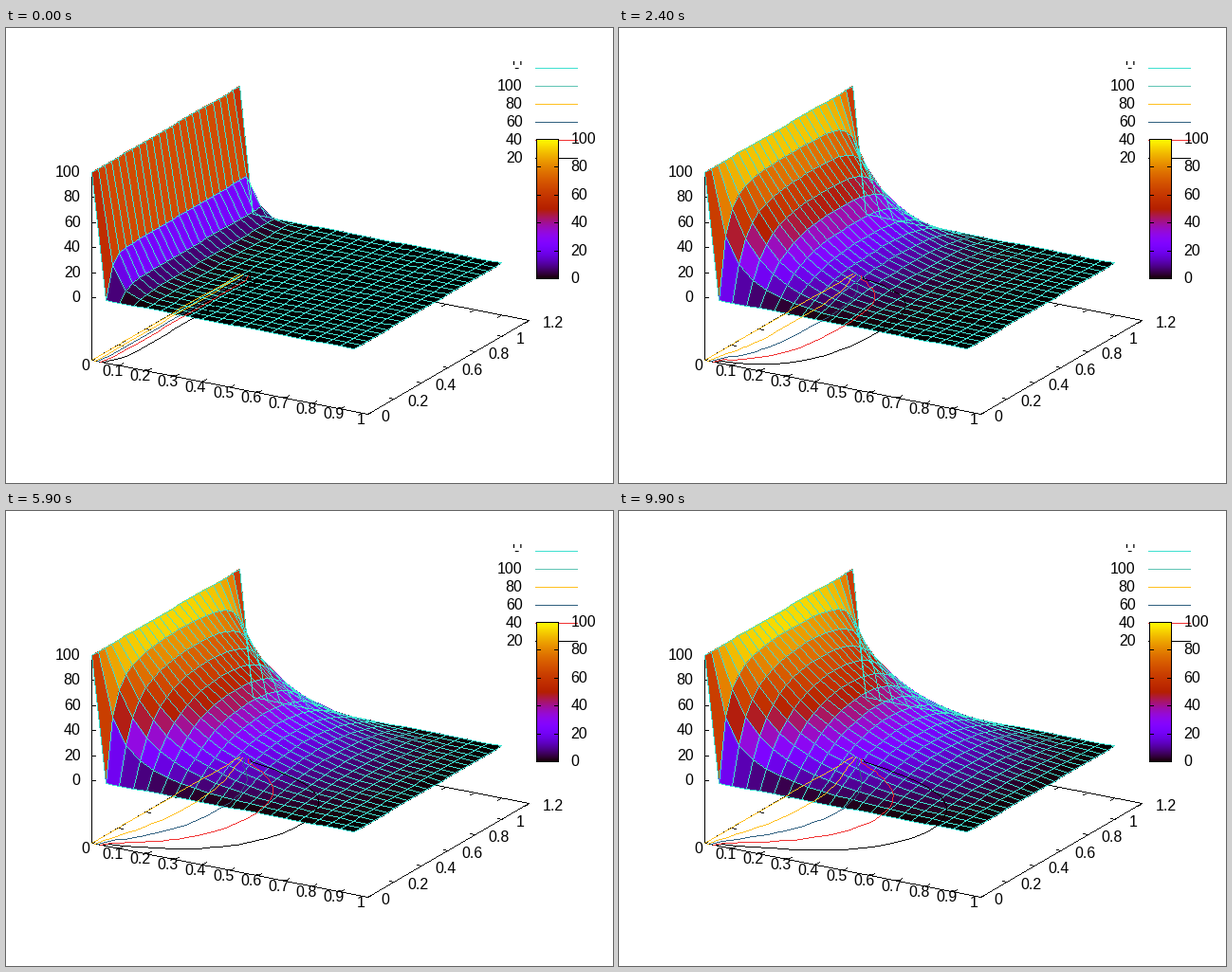
Recreate the animation shown at these times as a matplotlib script. Size 640 by 480 pixels, loop 10 s.

```python
import numpy as np
import matplotlib.pyplot as plt
from matplotlib.animation import FuncAnimation
from matplotlib.collections import PolyCollection
from matplotlib.patches import PathPatch
from matplotlib.path import Path

W, H, DPI = 640, 480, 100
FRAMES, INTERVAL = 100, 100
STEP, NX, NY = 0.05, 20, 23
TEAL, GOLD, BLUE, RED = "#40e0d0", "#ffc020", "#306080", "#f03232"
LEVELS = {20: "black", 40: RED, 60: BLUE, 80: GOLD}
BASE = -50

plt.rcParams["font.family"] = "Liberation Sans"
plt.rcParams["font.size"] = 16 * 72 / DPI


def project(x, y, z=BASE):
    """Data coordinates to stage pixels."""
    return 90 + 291 * x + 170 / 1.2 * y, 284 + 57 * x - 99 / 1.2 * y - 1.32 * z


def snap(p):
    return np.floor(np.asarray(p, float) + 0.5)


def palette(v):
    v = np.clip(v, 0, 1)
    blue = np.clip(np.sin(2 * np.pi * v), 0, 1)
    return np.stack([np.sqrt(v), v ** 3, blue], axis=-1)


def relax(u):
    """One Gauss-Seidel sweep of the Laplace equation."""
    u = u.copy()
    for i in range(1, NX - 1):
        for j in range(1, NY - 1):
            u[i, j] = (u[i - 1, j] + u[i + 1, j] + u[i, j - 1] + u[i, j + 1]) / 4
    return u


u = np.zeros((NX, NY))
u[0] = 100
states = []
for _ in range(FRAMES):
    u = relax(u)
    states.append(u)

gx, gy = np.meshgrid(np.arange(NX) * STEP, np.arange(NY) * STEP, indexing="ij")
floor_x, floor_y = project(gx, gy)

fig = plt.figure(figsize=(W / DPI, H / DPI), dpi=DPI, facecolor="white")
ax = fig.add_axes([0, 0, 1, 1])
ax.axis("off")
# Whole numbers are pixel centres.
ax.set_xlim(-0.5, W - 0.5)
ax.set_ylim(H - 0.5, -0.5)

SQUARE = np.array([[-0.5, -0.5], [0.5, -0.5], [0.5, 0.5], [-0.5, 0.5], [-0.5, -0.5]])
SQUARE_CODES = [Path.MOVETO, Path.LINETO, Path.LINETO, Path.LINETO, Path.CLOSEPOLY]


def pixel_path(polylines):
    """Hard-edged lines, one pixel wide, as a path of unit squares."""
    runs = [np.empty((0, 2))]
    for pts in polylines:
        pts = snap(pts)
        for p, d in zip(pts, np.diff(pts, axis=0)):
            n = max(int(np.abs(d).max()), 1)
            runs.append(p + snap(np.arange(n + 1)[:, None] / n * d))
    dots = np.concatenate(runs)
    verts = (dots[:, None] + SQUARE).reshape(-1, 2)
    return Path(verts, np.tile(SQUARE_CODES, len(dots)).astype(Path.code_type))


def pen(color, z, polylines=()):
    patch = PathPatch(pixel_path(polylines), facecolor=color, edgecolor="none",
                      linewidth=0, antialiased=False, zorder=z)
    return ax.add_artist(patch)


def tick(p, dx, dy, z=1):
    pen("black", z, [[p, (p[0] + dx, p[1] + dy)]])


def label(x, y, text, ha):
    x, y = snap((x, y))
    ax.text(x - 1, y + 4.5, text, ha=ha, va="baseline", zorder=9)


def draw_axes():
    corners = [project(*c) for c in ((0, 0), (1, 0), (1, 1.2), (0, 1.2), (0, 0))]
    pen("black", 1, [corners, [project(0, 0), project(0, 0, 100)]])
    for k in range(11):
        x = k / 10
        p = project(x, 0)
        tick(p, 4.3, -2.5)
        tick(project(x, 1.2), -4.3, 2.5)
        label(p[0] - 6, p[1] + 6, f"{x:g}", "center")
    for k in range(7):
        y = k / 5
        p = project(1, y)
        tick(p, -5, -1)
        tick(project(0, y), 5, 1)
        label(p[0] + 15, p[1] + 3, f"{y:g}", "left")
    for z in range(0, 101, 20):
        p = project(0, 0, z)
        tick(p, 4, 0)
        label(79, p[1], str(z), "right")


def draw_legend():
    rows = [("'-'", TEAL), ("100", "#60c4b4"), ("80", GOLD),
            ("60", BLUE), ("40", RED), ("20", "black")]
    for k, (text, color) in enumerate(rows):
        y = 42 + 19 * k
        pen(color, 1, [[(558, y), (602, y)]])
        label(545, y, text, "right")


def draw_colorbox():
    left, right, top, bottom = 559, 582, 117, 264
    ramp = palette(np.linspace(1, 0, bottom - top + 1))[:, None, :]
    ax.imshow(ramp, extent=(left - 0.5, right + 0.5, bottom + 0.5, top - 0.5),
              aspect="auto", interpolation="nearest", zorder=7)
    pen("black", 8, [[(left, top), (right, top), (right, bottom),
                      (left, bottom), (left, top)]])
    for v in range(0, 101, 20):
        y = bottom - (bottom - top) * v / 100
        tick((left, y), 4, 0, z=8)
        tick((right, y), -4, 0, z=8)
        label(596, y, str(v), "left")


draw_axes()
draw_legend()
draw_colorbox()

# The 100 level runs along the foot of the hot wall.
pen(GOLD, 5, [np.column_stack([floor_x[0], floor_y[0]])])

cells = PolyCollection([], edgecolors="none", linewidths=0, antialiased=False, zorder=3)
ax.add_collection(cells, autolim=False)
wires = pen(TEAL, 4)
contours = [pen(color, 5) for color in LEVELS.values()]


def update(n):
    u = states[n]
    pts = snap(np.stack(project(gx, gy, u), axis=-1))

    # Far rows first, so nearer cells cover them.
    quads = np.stack([pts[:-1, :-1], pts[1:, :-1], pts[1:, 1:], pts[:-1, 1:]], axis=2)
    mean = (u[:-1, :-1] + u[1:, :-1] + u[1:, 1:] + u[:-1, 1:]) / 400
    cells.set_verts(quads[:, ::-1].transpose(1, 0, 2, 3).reshape(-1, 4, 2))
    cells.set_facecolor(palette(mean[:, ::-1].T.ravel()))
    wires.set_path(pixel_path([*pts, *pts.transpose(1, 0, 2)]))

    found = ax.contour(floor_x, floor_y, u, levels=list(LEVELS))
    for patch, lines in zip(contours, found.allsegs):
        patch.set_path(pixel_path(lines))
    found.remove()
    return [cells, wires, *contours]


anim = FuncAnimation(fig, update, frames=FRAMES, interval=INTERVAL,
                     init_func=lambda: update(0), repeat=True, repeat_delay=0, blit=False)
plt.show()
```
